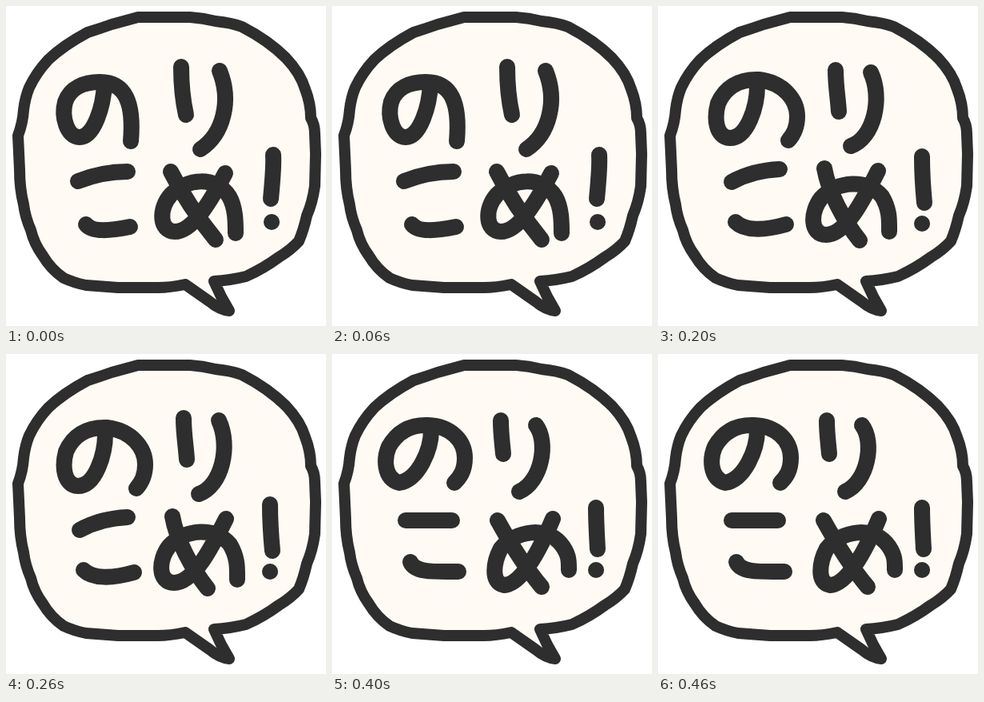
Recreate the animation shown at these times as an HTML page without scripts. Size 400 px wide and 400 px high, loop 0.5 s.

```html
<!DOCTYPE html>
<html lang="ja">
<head>
<meta charset="utf-8">
<title>のりこめ!</title>
<style>
  html, body { margin: 0; width: 100%; height: 100%; overflow: hidden; background: #fff; }
  svg { display: block; width: 100vw; height: 100vh; }
  path { stroke-linecap: round; stroke-linejoin: round; }
  .bubble { fill: #fffbf4; stroke: #2e2e2e; stroke-width: 14; }
  .pose { fill: none; stroke: #2e2e2e; stroke-width: 20; visibility: hidden; animation: show .5s step-end infinite; animation-delay: calc(var(--i) * .1s - .5s); }
  .pale { stroke: #444543; }
  @keyframes show { 0% { visibility: visible; } 20%, 100% { visibility: hidden; } }
</style>
</head>
<body>
<svg viewBox="0 0 400 400" role="img" aria-label="のりこめ!">
  <path class="bubble" d="M165 14L230 14Q246 15 262 19Q282 21 295 26Q328 43 350 65Q368 84 374 104Q381 122 381 140Q386 148 386 160L387 185L386 225Q383 246 376 262Q372 280 366 294Q356 305 341 314Q322 328 300 338Q280 343 260 344Q268 363 279 381Q267 380 254 369L224 348Q205 352 190 352L140 352L100 349Q85 346 72 340Q56 329 46 312Q35 297 31 280Q24 264 22 248Q17 228 17 205L15 162Q21 146 22 130Q24 114 29 102Q38 83 53 67Q72 49 102 33Q118 28 132 23Z"/>

  <!-- Each pose: の, り, こ, め, ! -->
  <g class="pose" style="--i:0">
    <path d="M123 97C122 125 110 164 92 164C76 164 69 138 74 120C80 102 98 95 117 95C150 95 160 122 156 169"/>
    <path d="M219 76C219 95 221 118 225 136M267 81C282 118 272 160 243 179"/>
    <path d="M90 219C110 211 130 207 152 207M100 273C108 283 130 281 155 276"/>
    <path d="M206 207C220 235 240 265 262 292M274 209C258 240 234 282 211 282C192 282 190 254 206 236C226 215 262 212 279 238C287 252 287 270 287 284"/>
    <path d="M334 186C335 200 333 220 331 241M332 270h.1"/>
  </g>
  <g class="pose pale" style="--i:1">
    <path d="M124 98C124 125 112 162 91 163C72 160 73 135 77 122C84 103 100 92 124 92C155 95 172 115 172 138C172 150 170 158 163 165"/>
    <path d="M220 80C220 100 220 115 226 134M263 83C276 118 272 155 243 172"/>
    <path d="M96 213C115 210 135 210 152 210M101 271C108 283 130 283 153 283"/>
    <path d="M212 206C222 235 240 265 260 290M283 207C265 245 240 288 214 288C195 285 195 258 207 240C228 218 265 214 285 235C298 252 295 270 293 288"/>
    <path d="M335 187L336 243M337 268h.1"/>
  </g>
  <g class="pose" style="--i:2">
    <path d="M124 100C124 125 112 165 90 165C72 164 70 140 75 122C83 103 100 91 126 92C158 96 174 118 174 138C174 152 170 160 163 168"/>
    <path d="M222 80C222 100 225 115 226 132M266 83C281 115 270 165 241 175"/>
    <path d="M92 220C110 210 128 205 152 204M97 270C108 281 132 281 160 273"/>
    <path d="M208 203C213 232 232 268 252 293M275 206C258 240 235 286 210 286C190 286 190 258 204 240C224 218 262 216 280 238C290 255 289 268 289 282"/>
    <path d="M330 188C330 210 331 225 333 246M330 272h.1"/>
  </g>
  <g class="pose" style="--i:3">
    <path d="M130 95C133 120 126 162 104 163C84 162 84 138 87 122C95 102 112 92 132 92C165 94 184 115 184 136C183 150 176 156 168 160"/>
    <path d="M236 80V126M277 83C294 115 287 155 254 169"/>
    <path d="M95 213C115 210 135 210 155 209M99 265C108 278 130 276 153 275"/>
    <path d="M203 207C215 232 230 262 245 281M268 209C252 240 230 283 208 285C188 283 190 258 203 238C225 214 262 214 280 237C291 254 290 265 290 277"/>
    <path d="M339 191C339 210 335 230 331 242M329 267h.1"/>
  </g>
  <g class="pose" style="--i:4">
    <path d="M124 95C124 120 108 157 84 161C64 155 65 130 71 116C80 100 95 88 120 89C148 90 166 108 166 130C166 146 160 154 153 161"/>
    <path d="M211 83C211 100 213 112 214 125M255 89C271 110 262 160 234 172"/>
    <path d="M92 208H150M98 260C104 274 130 272 158 272"/>
    <path d="M207 208C222 235 240 265 262 291M276 206C262 240 238 288 215 289C198 286 202 260 211 243C230 220 268 216 285 236C297 250 296 260 296 270"/>
    <path d="M330 192C330 210 331 225 332 244M330 270h.1"/>
  </g>
</svg>
</body>
</html>
```
